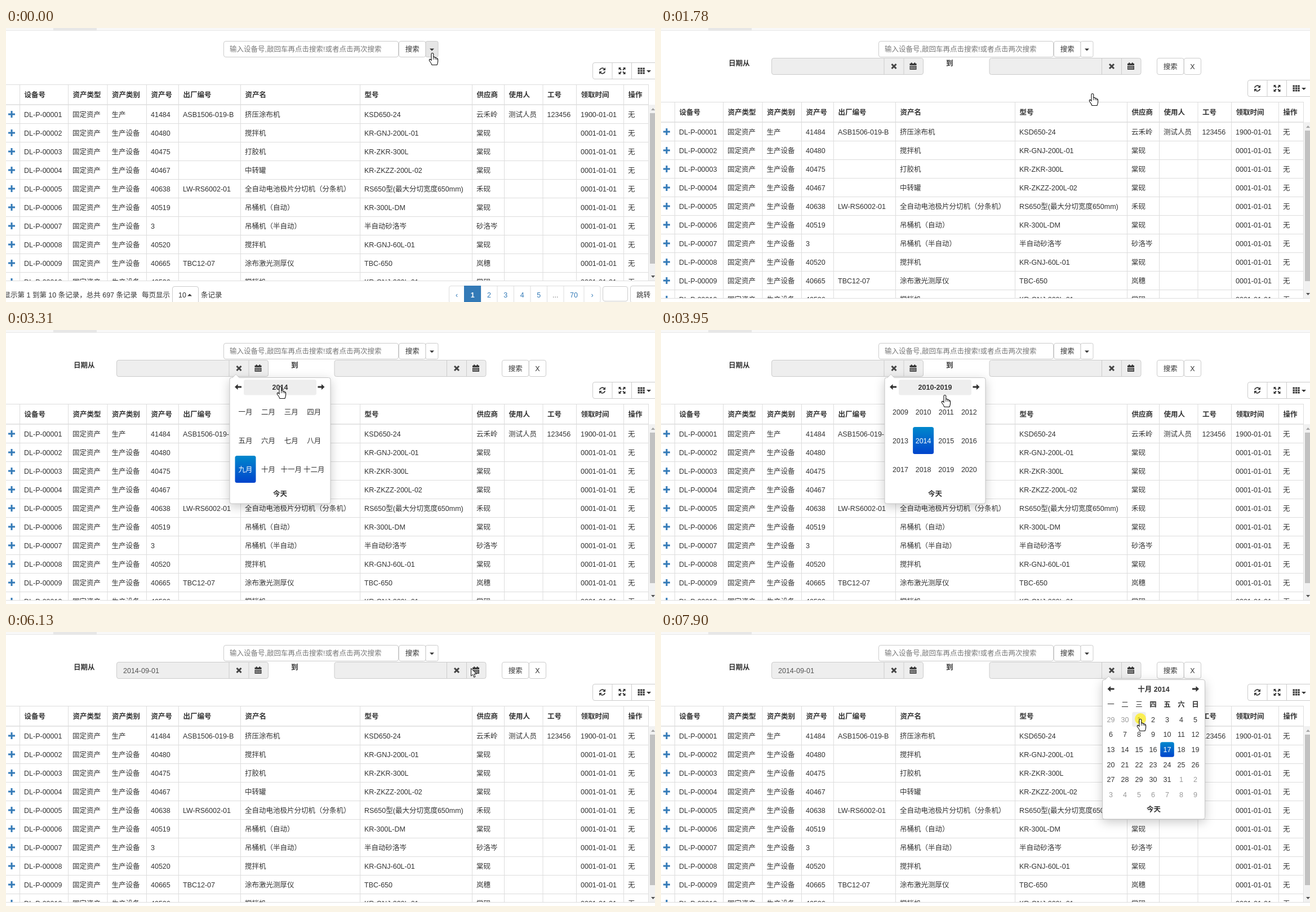
These frames come from a looping animation (1152 by 486 pixels, 7990 ms). An HTML page:

```html
<!DOCTYPE html>
<html lang="zh-CN">
<head>
<meta charset="utf-8">
<title>资产列表</title>
<style>
html, body { margin: 0; width: 100%; height: 100%; overflow: hidden; background: #fff; }
svg { display: block; width: 100vw; height: 100vh; }
text { font: 12.5px "Liberation Sans", "Noto Sans CJK SC", "Noto Sans CJK", sans-serif; white-space: pre; }
text.b { font-weight: 700; }
.panel { filter: drop-shadow(0 5px 9px rgba(0, 0, 0, .2)); }
</style>
</head>
<body>
<svg id="stage" viewBox="0 0 1152 486"></svg>
<script>
const LOOP = 7990, SHIFT = 31, INK = '#333', LINK = '#337ab7', EDGE = '#ccc', GRID = '#ddd';

// Drawing helpers: text is placed by its vertical centre.
const text = (x, cy, s, { fill = INK, bold = false, anchor = 'start' } = {}) =>
  `<text x="${x}" y="${cy + 4.5}" fill="${fill}" text-anchor="${anchor}"${bold ? ' class="b"' : ''}>${s}</text>`;
const mid = (x, cy, s, o) => text(x, cy, s, { ...o, anchor: 'middle' });
const rect = (x, y, w, h, fill, stroke = 'none', r = 0, extra = '') =>
  `<rect x="${x}" y="${y}" width="${w}" height="${h}" rx="${r}" fill="${fill}" stroke="${stroke}" ${extra}/>`;
const hot = (x, y, w, h, hover, { fill = 'transparent', stroke, r = 0 } = {}) =>
  rect(x, y, w, h, fill, stroke, r, `data-base="${fill}" data-hover="${hover}"`);
const path = (d, fill = INK, extra = '') => `<path d="${d}" fill="${fill}" ${extra}/>`;
const line = (x1, y1, x2, y2, c = GRID, w = 1) => path(`M${x1} ${y1}L${x2} ${y2}`, 'none', `stroke="${c}" stroke-width="${w}"`);
const at = (x, y, s) => `<g transform="translate(${x} ${y})">${s}</g>`;
const group = (id, s, hidden = true) => `<g id="${id}"${hidden ? ' display="none"' : ''}>${s}</g>`;
const caret = (x, y, up = 1) => path(`M${x - 4} ${y - 2 * up}h8l-4 ${4 * up}z`);
const button = (x, y, w, h, label) =>
  hot(x, y, w, h, '#e6e6e6', { fill: '#fff', stroke: EDGE, r: 3.5 }) + mid(x + w / 2, y + h / 2, label);
const range = (n, f) => Array.from({ length: n }, (_, i) => f(i)).join('');

const icons = {
  cross: path('M-4-4L4 4M4-4L-4 4', 'none', 'stroke="#444" stroke-width="3"'),
  calendar: path('M-6-5h2v-1.5h2.5V-5h3v-1.5H4V-5h2v3H-6z') +
    path('M-6-1H6V6H-6z', '#444') +
    path('M-4.5 1.2h9M-4.5 3.7h9', 'none', 'stroke="#eee" stroke-width="1.2" stroke-dasharray="1.5 .9"'),
  plus: path('M-6 0H6M0-6V6', 'none', `stroke="${LINK}" stroke-width="3"`),
  left: path('M-6 0L-.5-5V-1.6H6V1.6H-.5V5z'),
  right: path('M6 0L.5-5V-1.6H-6V1.6H.5V5z'),
  refresh: path('M-4.7-1A4.7 4.7 0 0 1 3-3.6M4.7 1A4.7 4.7 0 0 1-3 3.6', 'none', `stroke="${INK}" stroke-width="1.7"`) +
    path('M5.5-6v5h-5zM-5.5 6V1h5z'),
  full: range(4, i => `<g transform="rotate(${i * 90})">${path('M6-6V-1.5L4.5-3 2.2-.8.8-2.2 3-4.5 1.5-6z')}</g>`),
  tiles: range(9, i => rect(-6 + i % 3 * 4.4, -5.5 + Math.floor(i / 3) * 4, 3.4, 3, INK))
};

function header() {
  return rect(0, 0, 1152, 4, '#f8f8f8') + rect(84, 0, 77, 4, '#e7e7e7') + line(0, 4.5, 1152, 4.5, '#e7e7e7') +
    rect(386.5, 23.5, 310, 28, '#fff', EDGE, 3.5) +
    text(397, 37.5, '输入设备号,敲回车再点击搜索!或者点击两次搜索', { fill: '#777' }) +
    button(697.5, 23.5, 47.5, 28, '搜索') +
    hot(745, 23.5, 22, 28, '#e6e6e6', { fill: '#fff', stroke: EDGE, r: 2.5 }) + caret(756, 38.5);
}

const columns = [24.5, 110.5, 180, 249.5, 306.5, 416.5, 628.5, 827.5, 884.5, 953, 1012.5, 1096.5];
const titles = '设备号 资产类型 资产类别 资产号 出厂编号 资产名 型号 供应商 使用人 工号 领取时间 操作'.split(' ');
// asset number | serial | name | model | supplier
const assets = `41484|ASB1506-019-B|挤压涂布机|KSD650-24|云禾岭
40480||搅拌机|KR-GNJ-200L-01|棠砚
40475||打胶机|KR-ZKR-300L|棠砚
40467||中转罐|KR-ZKZZ-200L-02|棠砚
40638|LW-RS6002-01|全自动电池极片分切机（分条机）|RS650型(最大分切宽度650mm)|禾砚
40519||吊桶机（自动）|KR-300L-DM|棠砚
3||吊桶机（半自动）|半自动砂洛岑|砂洛岑
40520||搅拌机|KR-GNJ-60L-01|棠砚
40665|TBC12-07|涂布激光测厚仪|TBC-650|岚穗
40526||搅拌机|KR-GNJ-200L-01|棠砚`.split('\n').map((row, i) => [
  'DL-P-' + String(i + 1).padStart(5, '0'), '固定资产', i ? '生产设备' : '生产', ...row.split('|'),
  i ? '' : '测试人员', i ? '' : '123456', i ? '0001-01-01' : '1900-01-01', '无']);

function table() {
  const rows = assets.map((cells, i) => {
    const y = 153 + 33 * i;
    return at(10, y, icons.plus) + line(0, y + 16.5, 1141, y + 16.5) +
      cells.map((s, c) => s && text(columns[c] + 7.5, y, s)).join('');
  }).join('');
  const tools = rect(1041.5, 61.5, 130, 29, '#fff', EDGE, 3.5) +
    line(1076, 62, 1076, 90, EDGE) + line(1110.5, 62, 1110.5, 90, EDGE) +
    at(1058.5, 76, icons.refresh) + at(1093.5, 76, icons.full) + at(1127.5, 76, icons.tiles) + caret(1141, 77);
  const bar = rect(1141.5, 136, 11, 312, '#f1f1f1') + rect(1143, 151, 9, 267, '#c1c1c1') +
    path('M1145 146h7l-3.5-4z', '#a3a3a3') + path('M1145 439h7l-3.5 4z', '#505050');
  return tools + '<clipPath id="view"><rect y="95" width="1152" height="353"/></clipPath><g clip-path="url(#view)">' +
    rows + [...columns, 1140.5].map(x => line(x, 100, x, 448)).join('') + '</g>' +
    line(0, 100.5, 1141, 100.5) + line(0, 136, 1141, 136, GRID, 1.6) +
    titles.map((s, c) => text(columns[c] + 8, 118, s, { bold: true })).join('') +
    bar + line(0, 448.5, 1152, 448.5);
}

function pager() {
  const stops = [786.5, 813.5, 843, 872, 901.5, 931, 960.5, 990, 1026, 1055];
  const labels = ['‹', '1', '2', '3', '4', '5', '...', '70', '›'];
  return text(-4.5, 473, '显示第 1 到第 10 条记录，总共 697 条记录') + text(241, 473, '每页显示') +
    rect(295.5, 458.5, 46, 31, '#fff', EDGE, 3.5) + text(306, 473.5, '10') + caret(326, 473.5, -1) + text(346, 473, '条记录') +
    rect(786.5, 457.5, 268.5, 30, '#fff', GRID, 3.5) + stops.slice(1, -1).map(x => line(x, 458, x, 488)).join('') +
    rect(813, 457, 30, 31, LINK) +
    labels.map((s, i) => mid((stops[i] + stops[i + 1]) / 2, 473, s,
      { fill: i === 1 ? '#fff' : i === 6 ? '#777' : LINK, bold: i === 1 })).join('') +
    rect(1059.5, 458.5, 44, 26, '#fff', EDGE, 3.5) + rect(1108.5, 457.5, 60, 30, '#fff', EDGE, 3.5) + text(1119, 473, '跳转');
}

function menu() {
  const items = ['搜索资产编号', '搜索使用人工号', '根据日期搜索', '根据位置搜索', '根据资产类别搜索', '根据责任人搜索', '根据资产状态搜索', '导出搜索的资产'];
  return rect(745, 23.5, 22, 28, '#d4d4d4', '#8c8c8c', 2.5) + caret(756, 38.5) +
    rect(698, 54.5, 141, 212, '#fff', '#c8c8c8', 3.5, 'class="panel"') + line(699, 230.5, 838, 230.5, '#e5e5e5') +
    items.map((s, i) => {
      const y = i < 7 ? 71 + 23.2 * i : 250;
      return hot(698.5, y - 11.6, 140, 23.2, '#f5f5f5') + text(715.5, y, s);
    }).join('');
}

function dates() {
  const field = x => rect(x, 53.5, 269, 29, '#eee', EDGE, 3.5) +
    line(x + 199.5, 54, x + 199.5, 82, EDGE) + line(x + 234.5, 54, x + 234.5, 82, EDGE) +
    at(x + 217, 68, icons.cross) + at(x + 251, 68, icons.calendar);
  return text(120, 62, '日期从', { bold: true }) + text(506, 62, '到', { bold: true }) + field(196.5) + field(583) +
    button(880.5, 53.5, 47.5, 29, '搜索') + button(928.5, 53.5, 30, 29, 'X');
}

function popup(x, w, h, title) {
  const c = x + w / 2;
  return rect(x, 84.5, w, h, '#fff', '#c4c4c4', 3.5, 'class="panel"') +
    path(`M${x + 5} 85l6-6 6 6z`, '#fff') + path(`M${x + 5} 84.5l6-6 6 6`, 'none', `stroke="${EDGE}"`) +
    hot(c - 64.5, 88, 129, 27.5, '#eee', { r: 3.5 }) + mid(c, 101, title, { bold: true }) +
    at(x + 15, 101, icons.left) + at(x + w - 16.5, 101, icons.right) + mid(c, 84 + h - 17, '今天', { bold: true });
}

function cell(x, y, w, h, label, active, fill = INK) {
  const box = active ? rect(x - w / 2, y - h / 2, w, h, 'url(#active)', 'none', 3.5)
    : hot(x - w / 2, y - h / 2, w, h, '#eee', { r: 3.5 });
  return box + mid(x, y, label, { fill: active ? '#fff' : fill });
}

// lead = days shown from the previous month, which has prev days
function days(x, title, lead, prev, length, active) {
  return popup(x, 182, 247.5, title) +
    [...'一二三四五六日'].map((s, i) => mid(x + 15 + 25 * i, 128, s, { bold: i > 2 })).join('') +
    range(42, i => {
      const n = i - lead + 1, other = n < 1 || n > length;
      const label = n < 1 ? prev + n : n > length ? n - length : n;
      return cell(x + 15 + 25 * (i % 7), 155 + 26.7 * Math.floor(i / 7), 24.6, 26.5, label, n === active, other ? '#999' : INK);
    });
}

const twelve = (title, label, active) => popup(397, 179, 223.5, title) +
  range(12, i => cell(425 + 40.6 * (i % 4), 145 + 51 * Math.floor(i / 4), 37, 48, label(i), i === active));

const months = '一 二 三 四 五 六 七 八 九 十 十一 十二'.split(' ');
const stage = document.getElementById('stage');
stage.innerHTML =
  `<defs><linearGradient id="active" x2="0" y2="1"><stop stop-color="#08c"/><stop offset="1" stop-color="#04c"/></linearGradient></defs>` +
  group('body', table() + pager(), false) + header() +
  group('dates', dates()) + group('from', text(208, 68, '2014-09-01', { fill: '#555' })) + group('menu', menu()) +
  group('september', days(397, '九月 2014', 7, 31, 30, 1)) +
  group('months', twelve('2014', i => months[i] + '月', 8)) +
  group('years', twelve('2010-2019', i => 2009 + i, 5)) +
  group('october', days(783.5, '十月 2014', 2, 30, 31, 17)) +
  group('pointer',
    group('spot', '<circle r="10" fill="#ffee10" opacity=".7"/>') +
    group('hand', path('M-2 2Q-2 .5-.2.5T1.8 2V7.5Q4.5 7 5 8.6 7.3 8.2 7.6 9.8 9.6 9.8 9.6 12V15Q9.6 18 8 21.5H-1Q-2.5 17.5-5.6 14-6 11.6-4.6 11.4-3.2 11.4-2 13.2Z', '#fff', 'stroke="#111" stroke-width="1.1"') +
      path('M1.8 7.5V12M5 8.6V12M7.6 9.8V12.5', 'none', 'stroke="#111" stroke-width=".9"')) +
    group('arrow', path('M.5.5V14L3.6 11.2 5.8 16.4 8 15.4 5.8 10.4H10Z', '#fff', 'stroke="#111"')), false);

const scenes = [
  [-99, ''], [440, 'menu'], [1777, 'dates'], [2620, 'dates september'], [3161, 'dates months'], [3394, 'dates years'],
  [4340, 'dates months'], [4950, 'dates september'], [5799, 'dates from'], [6430, 'dates from october']
];
const panels = ['dates', 'from', 'menu', 'september', 'months', 'years', 'october'];
const presses = [[380, 440], [1700, 1777], [2540, 2620], [3084, 3161], [3317, 3394], [5720, 5799], [6350, 6430], [7900, LOOP]];
const arrows = [[1854, 2460], [5799, 6190]];
// first step, last step, number of steps, x, y
const moves = [
  [70, 70, 1, 756, 44], [670, 1065, 6, 768, 183], [1144, 1320, 3, 766, 141], [1400, 1540, 3, 766, 116],
  [1854, 2240, 6, 470, 72], [2380, 2460, 2, 443, 67], [2850, 3006, 3, 487, 100], [3472, 3550, 2, 500, 110],
  [3950, 3950, 1, 504, 115], [4027, 4180, 3, 467, 196], [4650, 4800, 3, 431, 242], [5030, 5490, 7, 412, 183],
  [5878, 6130, 4, 825, 64], [6190, 6270, 2, 832, 63], [6590, 6800, 3, 797, 150], [6880, 7130, 4, 924, 190],
  [7210, 7360, 3, 897, 217], [7540, 7710, 3, 851, 154]
];

function pointerAt(t) {
  let x = 757, y = 44;
  for (const [start, end, n, tx, ty] of moves) {
    if (t < start) break;
    const k = Math.min(n, 1 + Math.floor((t - start) / Math.max(1, end - start) * (n - 1))) / n;
    x += (tx - x) * k;
    y += (ty - y) * k;
  }
  return [Math.round(x), Math.round(y)];
}

const byId = id => document.getElementById(id);
const show = (id, on) => byId(id).setAttribute('display', on ? 'inline' : 'none');
const within = (spans, t) => spans.some(([a, b]) => t >= a && t < b);
const targets = [...stage.querySelectorAll('[data-hover]')].map(el => {
  const [x, y, w, h] = ['x', 'y', 'width', 'height'].map(k => +el.getAttribute(k));
  return { el, x, y, w, h, panel: el.closest('g[id]')?.id };
});

function render(t) {
  const [since, names] = scenes.findLast(s => s[0] <= t);
  const open = names.split(' ');
  panels.forEach(id => show(id, open.includes(id)));
  byId('body').setAttribute('transform', `translate(0 ${open.includes('dates') ? SHIFT : 0})`);

  const [px, py] = pointerAt(t), arrow = within(arrows, t);
  byId('pointer').setAttribute('transform', `translate(${px} ${py})`);
  show('spot', within(presses, t));
  show('arrow', arrow);
  show('hand', !arrow);

  // Hover catches up shortly after a panel changes.
  const settled = t - since >= 80;
  for (const { el, x, y, w, h, panel } of targets) {
    const over = settled && (!panel || open.includes(panel)) && px >= x && px < x + w && py >= y && py < y + h;
    el.setAttribute('fill', over ? el.dataset.hover : el.dataset.base);
  }
}

function tick() {
  render(performance.now() % LOOP);
  requestAnimationFrame(tick);
}
tick();
</script>
</body>
</html>
```
